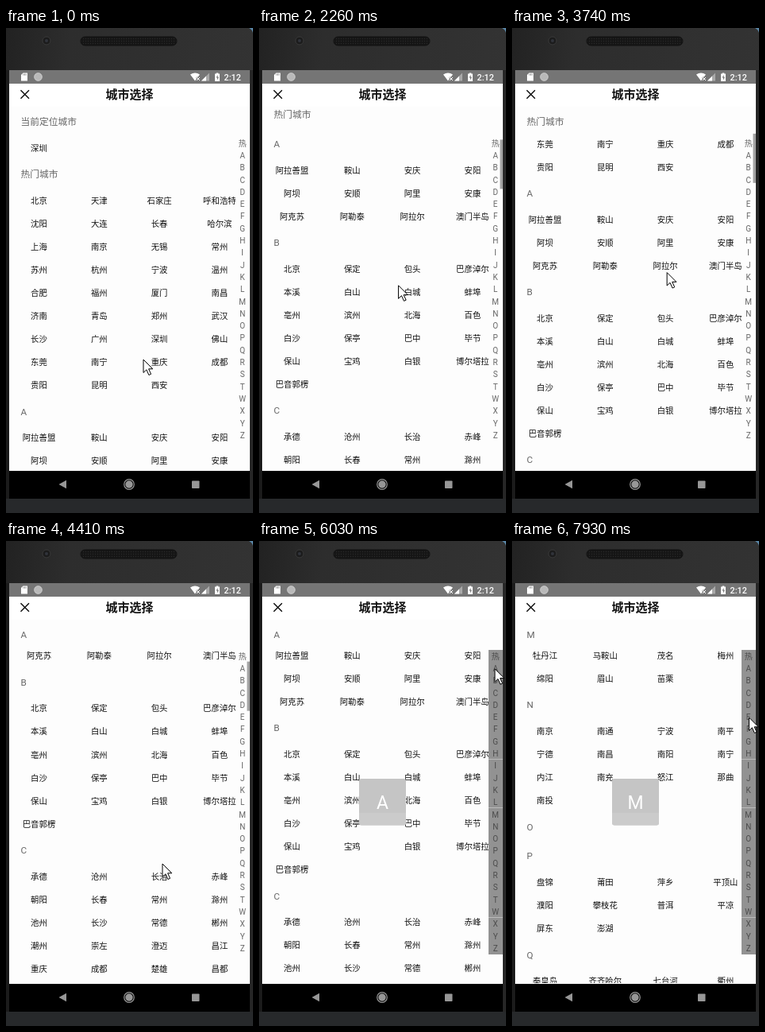
An HTML page that plays this animation: 311x610 px, repeating every 8 s.

```html
<!DOCTYPE html>
<html lang="zh-CN">
<head>
<meta charset="utf-8">
<title>城市选择</title>
<style>
html, body { margin: 0; width: 100%; height: 100%; overflow: hidden; background: #2b2b2b; }
svg { display: block; width: 311px; height: 610px; }
text { font-family: Roboto, "Noto Sans CJK SC", "Noto Sans CJK", sans-serif; }
.cell { font-size: 10.4px; fill: #111; text-anchor: middle; }
.head { font-size: 11.75px; fill: #666; }
.index { font-size: 10px; fill: #666; text-anchor: middle; }
</style>
</head>
<body>
<svg id="stage" viewBox="0 0 311 610">
  <defs>
    <linearGradient id="bezel" x2="1" y2=".25">
      <stop offset="0" stop-color="#222"/><stop offset=".25" stop-color="#2d2d2d"/><stop offset="1" stop-color="#333"/>
    </linearGradient>
    <pattern id="mesh" width="3" height="3" patternUnits="userSpaceOnUse">
      <rect width="3" height="3" fill="#151515"/><circle cx="1.5" cy="1.5" r=".7" fill="#292929"/>
    </pattern>
    <clipPath id="view"><rect x="4" y="99" width="303" height="457"/></clipPath>
  </defs>

  <rect width="311" height="610" fill="url(#bezel)"/>
  <rect y="53" width="4" height="539" fill="#1b1b1b"/>
  <rect x="307" y="53" width="4" height="539" fill="#262626"/>
  <path d="M306 0h5v6q-1-4-5-6z" fill="#5a87a8"/>
  <circle cx="51" cy="16" r="5" fill="#1c1c1c" stroke="#3a3a3a"/>
  <circle cx="51" cy="16" r="2" fill="#30333a"/>
  <rect x="94" y="11" width="121" height="11" rx="5.5" fill="url(#mesh)" stroke="#111"/>
  <rect y="592" width="311" height="18" fill="#27292b"/>

  <rect x="4" y="53" width="303" height="504" fill="#fdfdfd"/>
  <g clip-path="url(#view)">
    <g id="list"></g>
    <rect id="stickyBack" x="4" y="99" width="303" fill="#fdfdfd"/>
    <text id="sticky" class="head" x="18.5"></text>
    <rect id="bar" x="303.5" width="3.5" height="62" fill="#a2a2a2"/>
  </g>

  <rect x="4" y="53" width="303" height="17" fill="#757575"/>
  <g fill="#fff">
    <path d="M21.5 56.5h5.5v10h-8v-7.5z"/>
    <path d="M21.8 57.6v2M23.5 57.6v2M25.2 57.6v2" stroke="#757575" stroke-width=".8"/>
    <circle cx="40.5" cy="61.5" r="4.8" fill="#b9b9b9" stroke="#d0d0d0"/>
    <path d="M232 58.5q6-4 12 0l-6 8z"/>
    <path d="M240 62l4 4m0-4l-4 4" stroke="#757575" stroke-width="2.4"/>
    <path d="M240 62l4 4m0-4l-4 4" stroke="#fff" stroke-width="1"/>
    <path d="M246 66.5l10-10v10z" fill="#a9a9a9"/>
    <path d="M246 66.5l6-6v6z"/>
    <path d="M263 57.5h1.7v-1h2.6v1h1.7v9.5h-6z"/>
    <path d="M266.6 59l-2 3.5h1.4v3l2-3.7h-1.4z" fill="#757575"/>
    <text x="274.5" y="66" font-size="10.8" font-weight="500">2:12</text>
  </g>
  <rect x="4" y="70" width="303" height="29" fill="#fff"/>
  <path d="M18.5 78.3l10.5 10.5m0-10.5l-10.5 10.5" stroke="#111" stroke-width="1.5"/>
  <text x="155.5" y="89.3" font-size="15" font-weight="700" text-anchor="middle" fill="#111">城市选择</text>

  <g id="side">
    <g id="shade">
      <rect x="289" y="137" width="18" height="383" fill="#929292"/>
      <path d="M289 274.5h18M289 335.5h18M289 473.5h18" stroke="#c4c4c4" stroke-width=".8"/>
    </g>
  </g>
  <g id="bubble">
    <rect x="126" y="299" width="59" height="58.5" rx="3" fill="#c5c5c5"/>
    <path d="M126 342h59v12.500q0 3-3 3h-53q-3 0-3-3z" fill="#cbcbcb"/>
    <text id="letter" x="155.5" y="337" font-size="23" fill="#fff" text-anchor="middle"></text>
  </g>

  <rect x="4" y="557" width="303" height="35" fill="#000"/>
  <g fill="#979797">
    <path d="M66.500 574l9.500-5.200v10.400z"/>
    <circle cx="155" cy="574" r="6.300" fill="none" stroke="#979797" stroke-width="1.200"/>
    <circle cx="155" cy="574" r="4.700"/>
    <rect x="234" y="569.500" width="9.500" height="9.500" rx=".8"/>
  </g>
  <path id="cursor" d="M0 0V16.500l3.900-3.700 3 6.700 2.700-1.200-3-6.500h5.200z" fill="#fff" stroke="#000" stroke-width="1"/>
</svg>
<script>
const $ = id => document.getElementById(id);
const ROW = 29.06, GAP = 36.9, TOP = 118, PERIOD = 8000;

const sections = [
  ['当前定位城市', '深圳'],
  ['热门城市', '北京 天津 石家庄 呼和浩特 沈阳 大连 长春 哈尔滨 上海 南京 无锡 常州 苏州 杭州 宁波 温州 合肥 福州 厦门 南昌 济南 青岛 郑州 武汉 长沙 广州 深圳 佛山 东莞 南宁 重庆 成都 贵阳 昆明 西安'],
  ['A', '阿拉善盟 鞍山 安庆 安阳 阿坝 安顺 阿里 安康 阿克苏 阿勒泰 阿拉尔 澳门半岛'],
  ['B', '北京 保定 包头 巴彦淖尔 本溪 白山 白城 蚌埠 亳州 滨州 北海 百色 白沙 保亭 巴中 毕节 保山 宝鸡 白银 博尔塔拉 巴音郭楞'],
  ['C', '承德 沧州 长治 赤峰 朝阳 长春 常州 滁州 池州 长沙 常德 郴州 潮州 崇左 澄迈 昌江 重庆 成都 楚雄 昌都 昌吉'],
  ['D', '大同 大连 丹东 大庆 大兴安岭 东营 德州 东莞 儋州 东方 定安 德阳 达州 大理 德宏 迪庆 定西'],
  ['E', '鄂尔多斯 鄂州 恩施'],
  ['F', '抚顺 阜新 阜阳 福州 抚州 佛山 防城港'],
  ['G', '赣州 广州 桂林 贵港 广元 广安 甘孜 贵阳 甘南 果洛 固原 高雄'],
  ['H', '邯郸 衡水 呼和浩特 呼伦贝尔 葫芦岛 哈尔滨 鹤岗 黑河 淮安 杭州 湖州 合肥 淮南 淮北 黄山 菏泽 鹤壁 黄石 黄冈 衡阳 怀化 惠州 河源 贺州 河池 海口 红河 汉中 海东 海北 黄南 海南 海西 哈密 和田 花莲'],
  ['I', ''],
  ['J', '晋城 晋中 锦州 吉林 鸡西 佳木斯 嘉兴 金华 景德镇 九江 吉安 济南 济宁 焦作 济源 荆门 荆州 江门 揭阳 嘉峪关 金昌 酒泉 基隆 嘉义'],
  ['K', '开封 昆明 克拉玛依 克孜勒苏 喀什'],
  ['L', '廊坊 临汾 吕梁 辽阳 辽源 连云港 丽水 六安 龙岩 莱芜 临沂 聊城 洛阳 漯河 娄底 柳州 来宾 临高 乐东 陵水 泸州 乐山 凉山 六盘水 丽江 临沧 拉萨 林芝 兰州 陇南 临夏 连江'],
  ['M', '牡丹江 马鞍山 茂名 梅州 绵阳 眉山 苗栗'],
  ['N', '南京 南通 宁波 南平 宁德 南昌 南阳 南宁 内江 南充 怒江 那曲 南投'],
  ['O', ''],
  ['P', '盘锦 莆田 萍乡 平顶山 濮阳 攀枝花 普洱 平凉 屏东 澎湖'],
  ['Q', '秦皇岛 齐齐哈尔 七台河 衢州 泉州 青岛 清远 钦州 琼海 琼中 黔西南 黔东南 黔南 曲靖 庆阳'],
  ['R', '日照 日喀则'],
  ['S', '石家庄 朔州 沈阳 松原 四平 双鸭山 绥化 上海 苏州 宿迁 绍兴 宿州 三明 上饶 三门峡 商丘 十堰 随州 神农架 邵阳 深圳 韶关 汕头 汕尾 三亚 三沙 遂宁 山南 商洛 石嘴山 石河子']
].map(([name, cities]) => ({ name, cities: cities.split(' ').filter(Boolean) }));

function addText(parent, cls, x, y, str) {
  const el = document.createElementNS('http://www.w3.org/2000/svg', 'text');
  el.setAttribute('class', cls);
  el.setAttribute('x', x);
  el.setAttribute('y', y);
  el.textContent = str;
  parent.appendChild(el);
  return el;
}

let pressed, offset = 0;
for (const sec of sections) {
  sec.top = offset;
  addText($('list'), 'head', 18.5, TOP + offset + 4.4, sec.name);
  sec.cities.forEach((city, i) => {
    const y = TOP + offset + 33 + Math.floor(i / 4) * ROW;
    const cell = addText($('list'), 'cell', 41.5 + (i % 4) * 75.8, y + 3.9, city);
    if (city === '包头') pressed = cell;
  });
  offset += GAP + Math.ceil(sec.cities.length / 4) * ROW;
}
const find = name => sections.find(s => s.name === name);

const marks = [...'热ABCDEFGHIJKLMNOPQRSTWXYZ'].map((ch, i) =>
  addText($('side'), 'index', 297.7, 148.600 + i * 15.3, ch));

// Screen refreshes: first, last, count
const bursts = [[500, 1440, 8], [1560, 1840, 3], [2110, 3070, 8], [3220, 4260, 9],
  [4410, 5310, 8], [5470, 6420, 8], [6580, 7500, 8], [7660, 7930, 3]];

const scrollKeys = [[400, 0], [900, 165], [1150, 270], [1440, 326.5], [1560, 326.5], [1700, 420],
  [1840, 480], [2000, 480], [2500, 190], [2900, 43], [3150, 43], [3700, 260], [4000, 370],
  [4260, 429], [4410, 429], [4700, 700], [5000, 1600], [5180, 1960], [5310, find('M').top - 178]];

const cursorKeys = [[400, 173, 417], [800, 172, 250], [1440, 174, 313], [1560, 170, 254],
  [1840, 170, 205], [2000, 172, 225], [2900, 185, 585], [2960, 185, 585], [3070, 190, 530],
  [3700, 195, 300], [4260, 197, 406], [4410, 197, 406], [4800, 205, 200], [5310, 283, 203],
  [5606, 297, 148], [6149, 297, 165], [6420, 297, 215], [6843, 297, 324], [7106, 298, 400],
  [7237, 298, 425], [7500, 298, 360], [7660, 298, 320], [7930, 298.5, 222]];

// Letters touched while dragging along the index
const touches = [[5741, '热'], [6013, 'A'], [6284, 'B'], [6420, 'C'], [6580, 'D'], [6711, 'E'],
  [6840, 'F'], [6970, 'G'], [7100, 'J'], [7230, 'M'], [7360, 'P'], [7495, 'Q'], [7790, 'N'], [7925, 'M']];

function refreshTime(t) {
  t += 8;
  let shown = 0;
  for (const [a, b, n] of bursts) {
    if (t < a) break;
    const step = (b - a) / (n - 1);
    shown = Math.min(b, a + Math.floor((t - a) / step) * step);
  }
  return shown;
}

function track(keys, t) {
  const i = keys.findIndex(k => k[0] > t);
  if (i < 0) return keys[keys.length - 1].slice(1);
  if (i === 0) return keys[0].slice(1);
  const a = keys[i - 1], b = keys[i], u = (t - a[0]) / (b[0] - a[0]);
  return a.slice(1).map((v, k) => v + (b[k + 1] - v) * u);
}

function showSticky(scroll) {
  const i = Math.max(0, sections.findLastIndex(s => s.top <= scroll));
  const next = sections[i + 1];
  const y = next ? Math.min(TOP, TOP + next.top - scroll - GAP) : TOP;
  $('sticky').textContent = sections[i].name;
  $('sticky').setAttribute('y', y + 4.4);
  $('stickyBack').setAttribute('height', Math.max(0, y + 18.5 - 99));
}

function render(now) {
  const t = refreshTime(now % PERIOD);
  const touch = touches.findLast(k => k[0] <= t + 1);
  const scroll = touch
    ? find(touch[1] === '热' ? '热门城市' : touch[1]).top + 7
    : track(scrollKeys, t)[0];

  $('list').setAttribute('transform', `translate(0 ${-scroll})`);
  showSticky(scroll);
  pressed.setAttribute('opacity', t >= 1560 && t < 1700 ? 0.3 : 1);

  $('bar').setAttribute('y', 99.5 + scroll * 0.1215);
  $('bar').setAttribute('visibility', t >= 500 && !touch ? 'visible' : 'hidden');

  const shown = touch ? 'visible' : 'hidden';
  $('shade').setAttribute('visibility', shown);
  $('bubble').setAttribute('visibility', shown);
  $('letter').textContent = touch ? touch[1] : '';
  for (const m of marks) m.style.fill = touch ? '#4c4c4c' : '#666';

  $('cursor').setAttribute('transform', `translate(${track(cursorKeys, t).join(' ')})`);
}

const start = performance.now();
function loop() {
  render(performance.now() - start);
  requestAnimationFrame(loop);
}
loop();
</script>
</body>
</html>
```
